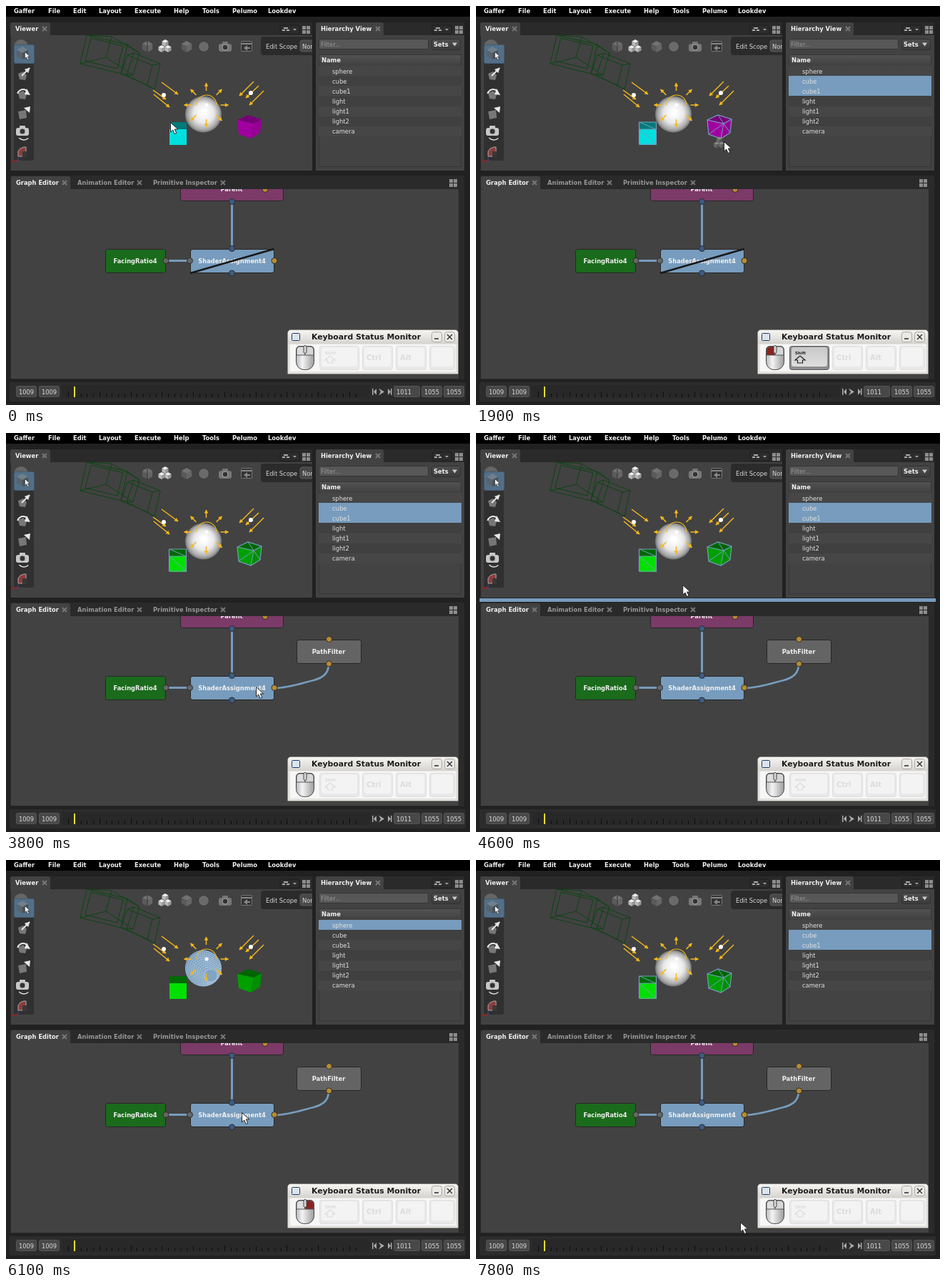
Write an HTML page with a canvas that moves like this. It is 650x560 px and loops after 8 s.

```html
<!DOCTYPE html>
<html>
<head>
<meta charset="utf-8">
<style>
html, body { margin: 0; width: 100%; height: 100%; overflow: hidden; background: #222; }
canvas { display: block; }
</style>
</head>
<body>
<canvas id="stage" width="650" height="560"></canvas>
<script>
const c = document.getElementById('stage').getContext('2d');
const BLUE = '#779cbd', AMBER = '#b98c30', NAVY = '#3d5c86', GOLD = '#f4b91c', PANE = '#424242';

// ---------- drawing helpers ----------
function box(x, y, w, h, fill, r = 0, stroke) {
  c.beginPath();
  c.roundRect(x, y, w, h, r);
  if (fill) { c.fillStyle = fill; c.fill(); }
  if (stroke) { c.strokeStyle = stroke; c.lineWidth = 1; c.stroke(); }
}
function path(pts, color, w = 1, fill) {
  c.beginPath();
  for (let i = 0; i < pts.length; i += 2) c.lineTo(pts[i], pts[i + 1]);
  if (fill) { c.closePath(); c.fillStyle = fill; c.fill(); }
  if (color) { c.strokeStyle = color; c.lineWidth = w; c.stroke(); }
}
const poly = (pts, fill, stroke, w) => path(pts, stroke, w, fill);
function dot(x, y, r, fill, stroke) {
  c.beginPath();
  c.arc(x, y, r, 0, 7);
  if (fill) { c.fillStyle = fill; c.fill(); }
  if (stroke) { c.strokeStyle = stroke; c.lineWidth = 1; c.stroke(); }
}
function arc(x, y, r, a, b, color, w) {
  c.beginPath();
  c.arc(x, y, r, a, b);
  c.strokeStyle = color;
  c.lineWidth = w;
  c.stroke();
}
function text(s, x, y, color = '#dcdcdc', bold = false, size = 8.35, align = 'left') {
  c.font = `${bold ? 'bold ' : ''}${size}px "DejaVu Sans", sans-serif`;
  c.textAlign = align;
  c.fillStyle = color;
  c.fillText(s, x, y + size * 0.36);
}
function shade(y0, y1, a, b) {
  const g = c.createLinearGradient(0, y0, 0, y1);
  g.addColorStop(0, a);
  g.addColorStop(1, b);
  return g;
}
function arrow(x0, y0, x1, y1, color = GOLD, w = 1.5, head = 5) {
  path([x0, y0, x1, y1], color, w);
  const a = Math.atan2(y1 - y0, x1 - x0), p = d => [x1 - head * Math.cos(a + d), y1 - head * Math.sin(a + d)];
  poly([x1, y1, ...p(.5), ...p(-.5)], color, color, .5);
}
function isoCube(x, y, s, top, left, right) {
  poly([x, y - s, x + s * .9, y - s * .5, x, y, x - s * .9, y - s * .5], top);
  poly([x - s * .9, y - s * .5, x, y, x, y + s, x - s * .9, y + s * .5], left);
  poly([x + s * .9, y - s * .5, x, y, x, y + s, x + s * .9, y + s * .5], right);
}
function clip(x, y, w, h, draw) {
  c.save();
  c.beginPath();
  c.rect(x, y, w, h);
  c.clip();
  draw();
  c.restore();
}

// ---------- timeline ----------
const moves = [
  [0, 230, 163], [300, 230, 163], [900, 335, 161], [1200, 339, 165], [1700, 339, 166],
  [1900, 347, 190], [2500, 350, 356], [4000, 350, 356], [4900, 268, 163], [5300, 268, 163],
  [6100, 330, 354], [6500, 330, 354], [6900, 372, 487], [7300, 370, 508], [8000, 370, 508]
];
function cursorAt(t) {
  const i = moves.findIndex((m, k) => k && t <= m[0]);
  const [t0, x0, y0] = moves[i - 1], [t1, x1, y1] = moves[i];
  const u = (t - t0) / (t1 - t0), e = u * u * (3 - 2 * u);
  return [x0 + (x1 - x0) * e, y0 + (y1 - y0) * e];
}
const during = (t, ...spans) => spans.some(([a, b]) => t >= a && t < b);
function stateAt(t) {
  return {
    t, cursor: cursorAt(t),
    left: during(t, [100, 300], [1000, 1200], [1400, 2700], [2800, 3000], [4900, 5200], [7600, 7800]),
    right: during(t, [6100, 6600]),
    shift: during(t, [700, 2300]),
    keyD: during(t, [3200, 3800]),
    drag: during(t, [1900, 2700]),
    cubeSel: during(t, [1000, 4900], [7600, 8000]),
    cube1Sel: during(t, [100, 4900], [7600, 8000]),
    sphereSel: during(t, [4900, 7600]),
    filter: t >= 2700, enabled: t >= 3200,
    menu: during(t, [6200, 7600]),
    splitter: during(t, [4600, 4700])
  };
}

// ---------- frame of the window ----------
function layoutIcon(x, y) {
  for (const i of [0, 1]) for (const j of [0, 1]) box(x + i * 6, y + j * 6, 5, 5, '#8c8c8c');
}
function tab(s, x, y, closeX, active) {
  if (active) box(x - 7, y - 9, closeX - x + 15, 19, PANE, [3, 3, 0, 0]);
  text(s, x, y, active ? '#f0f0f0' : '#969696', true);
  path([closeX - 3, y - 3, closeX + 3, y + 3], '#777', 2);
  path([closeX + 3, y - 3, closeX - 3, y + 3], '#777', 2);
}
function pinButton(x) {
  box(x, 27, 27, 12, '#2d2d2d', 2, '#1c1c1c');
  box(x + 3, 33, 4, 2, '#aaa');
  box(x + 9, 33, 4, 2, '#aaa');
  box(x + 5, 30, 6, 2, '#aaa');
  poly([x + 18, 32, x + 23, 32, x + 20.5, 34.5], '#aaa');
}
function chrome(s) {
  box(0, 0, 650, 560, '#212121');
  box(0, 0, 650, 15, '#000');
  'Gaffer 11 File 59 Edit 94 Layout 130 Execute 180 Help 235 Tools 275 Pelumo 317 Lookdev 367'
    .replace(/(\w+) (\d+)/g, (_, w, x) => text(w, +x, 7, '#f2f2f2', true));
  box(6, 23, 423, 208, '#2a2a2a');
  box(434, 23, 208, 208, '#2a2a2a');
  box(6, 238, 636, 286, '#2a2a2a');
  if (s.splitter) box(5, 232, 639, 5, BLUE);
  tab('Viewer', 13, 32, 54, true);
  tab('Hierarchy View', 441, 32, 521, true);
  tab('Graph Editor', 14, 248, 82, true);
  tab('Animation Editor', 100, 248, 187);
  tab('Primitive Inspector', 206, 248, 304);
  pinButton(384);
  pinButton(597);
  layoutIcon(415, 28);
  layoutIcon(629, 28);
  layoutIcon(621, 243);
}

// ---------- viewer ----------
function cameraWire() {
  const g = '#0b4512';
  path([113, 41, 104, 81, 161, 95, 170, 54, 113, 41], g);
  path([119, 45, 111, 77, 156, 88, 164, 56, 119, 45], g);
  path([113, 41, 148, 43, 187, 66, 170, 54], g);
  path([148, 43, 140, 72, 104, 81], g);
  path([140, 72, 178, 97, 161, 95], g);
  path([187, 66, 178, 97], g);
  path([179, 66, 216, 81, 208, 117, 169, 97, 179, 66], g);
  path([170, 69, 205, 83, 198, 111, 161, 95, 170, 69, 179, 66], g);
  path([205, 83, 216, 81], g);
  path([198, 111, 208, 117], g);
}
function sphere(selected) {
  const x = 276.5, y = 152, r = 25.5;
  const g = c.createRadialGradient(x + 1, y - 3, 3, x, y, r);
  g.addColorStop(0, selected ? '#86a8c7' : '#fff');
  g.addColorStop(.5, selected ? '#86a8c7' : '#e8e8e8');
  g.addColorStop(.85, selected ? '#7b9fbf' : '#a8a8a8');
  g.addColorStop(1, selected ? '#779cbd' : '#747474');
  dot(x, y, r, g);
  if (!selected) return;
  c.save();
  c.beginPath();
  c.arc(x, y, r, 0, 7);
  c.clip();
  c.setLineDash([1.4, 1.4]);
  c.strokeStyle = '#d4e0ea';
  c.lineWidth = 1;
  for (let i = 3; i < 17; i++) {
    c.beginPath();
    c.ellipse(287 - i * .8, 164 - i * .9, 2 + i * 2.1, 1.6 + i * 1.9, .8, 0, 7);
    c.stroke();
  }
  c.setLineDash([]);
  dot(287, 162, 9, '#80a4c4', '#a9c3da');
  c.restore();
}
function cubes(s) {
  const green = s.enabled;
  box(229, 163, 24, 10, green ? '#006800' : '#007a7a');
  box(229, 173, 24, 22, green ? '#00e000' : '#00dfdf');
  if (s.cube1Sel) {
    path([228.5, 163, 252.5, 163, 252.5, 194, 228.5, 194, 228.5, 163], BLUE, 1.2);
    path([252.5, 173, 228.5, 173, 252.5, 194], BLUE, 1);
    path([229, 163, 252, 173], BLUE, 1);
  }
  const [top, left, right] = green ? ['#006400', '#00a000', '#009000'] : ['#780078', '#a000a0', '#960096'];
  poly([324, 160, 339, 153, 358, 159, 347, 165], top);
  poly([324, 160, 347, 165, 343, 186, 326, 180], left);
  poly([347, 165, 358, 159, 356, 178, 343, 186], right);
  if (s.cubeSel) {
    path([324, 160, 339, 153, 358, 159, 356, 178, 343, 186, 326, 180, 324, 160, 347, 165, 358, 159], BLUE, 1.2);
    path([326, 180, 347, 165, 343, 186], BLUE, 1);
    path([339, 153, 347, 165, 356, 178], BLUE, 1);
  }
}
function lights() {
  for (let i = 0; i < 8; i++) {
    const a = i * Math.PI / 4, u = Math.cos(a), v = Math.sin(a);
    arrow(280.5 + u * 20, 139 + v * 20, 280.5 + u * 31, 139 + v * 31);
  }
  arc(281, 139, 14, Math.PI, Math.PI * 2, GOLD, 1.2);
  dot(281, 139, 2.5, '#fff');
  arrow(218, 107, 241, 124);
  arrow(206, 118, 224, 131);
  arrow(207, 124, 229, 142);
  arrow(347, 106, 327, 126);
  arrow(354, 112, 336, 129);
  arrow(361, 119, 341, 139);
  dot(221, 125, 3, '#fff');
  dot(343, 122, 3, '#fff');
}
function photoIcon(x, y, col) {
  box(x - 9, y - 5, 18, 11, col, 3);
  box(x - 4, y - 8, 8, 4, col, 1);
  dot(x, y, 4, '#333', '#aaa');
}
function viewerTools() {
  dot(21, 57, 10, '#666');
  box(11, 54, 28, 163, 'rgba(42,42,42,.75)', 3);
  box(11.5, 54.5, 28, 26, '#536f88', 2, '#435b70');
  isoCube(23, 66, 9, '#707f8c', '#58636d', '#48525b');
  pointer(26, 64, .7);
  poly([17, 95, 24, 92, 29, 97, 27, 104, 19, 103], '#777');
  arrow(22, 98, 33, 87, '#e8e8e8', 2, 7);
  poly([17, 122, 24, 119, 29, 124, 27, 131, 19, 130], '#777');
  arc(24, 125, 8, 3.4, 5.6, '#e8e8e8', 2);
  poly([29, 116, 34, 125, 26, 124], '#e8e8e8');
  poly([17, 148, 28, 146, 29, 157, 19, 159], '#777');
  poly([34, 141, 33, 150, 25, 143], '#e8e8e8');
  photoIcon(23, 176, '#c8c8c8');
  arc(25, 179, 9, .8, 2.4, '#ddd', 1.5);
  poly([17, 211, 17, 204, 20, 200, 25, 198, 28, 198, 28, 211], '#8e3c3c', '#aaa', 1);
  box(23, 204, 6, 8, '#383838');
  path([7, 219, 18, 216], '#a02020', 1.5);
  path([17, 212, 17, 219], '#2c4890', 1);

  for (const x of [198, 253]) isoCube(x, 57, 8, '#727272', '#5a5a5a', '#666');
  path([198, 49, 198, 65], '#333');
  for (const [x, y] of [[223, 52], [218, 60], [227, 60]]) isoCube(x, y, 5, '#eee', '#bbb', '#999');
  dot(277, 57, 7.5, '#6a6a6a', '#383838');
  photoIcon(307, 58, '#777');
  box(329.5, 49.5, 15, 14, '#333', 1, '#777');
  path([330, 53, 344, 53], '#888', 2);
  poly([333, 59, 338, 55, 338, 58, 342, 58, 342, 60, 338, 60, 338, 63], '#888');
  box(357, 43, 80, 26, '#2b2b2b', 4);
  text('Edit Scope', 364, 57, '#d8d8d8');
  box(412, 48, 30, 16, '#484848', 3, '#5a5a5a');
  text('None', 415, 57, '#d8d8d8');
}
function viewer(s) {
  clip(7, 41, 422, 190, () => {
    box(7, 41, 422, 190, PANE);
    cameraWire();
    sphere(s.sphereSel);
    cubes(s);
    lights();
    viewerTools();
  });
}

// ---------- hierarchy ----------
function hierarchy(s) {
  box(434, 41, 208, 190, PANE);
  box(438.5, 46.5, 153, 14, '#575757', 2, '#343434');
  text('Filter...', 441, 54, '#989898');
  box(596.5, 46.5, 40, 15, shade(46, 62, '#505050', '#3a3a3a'), 3, '#303030');
  text('Sets', 599, 54, '#f0f0f0', true);
  poly([625, 51.5, 632, 51.5, 628.5, 56.5], '#ccc');
  box(438.5, 68.5, 199, 157, '#434343', 0, '#363636');
  box(439, 69, 198, 15, shade(69, 84, '#525252', '#404040'));
  text('Name', 442, 76, '#f0f0f0', true);
  const sel = [s.sphereSel, s.cubeSel, s.cube1Sel], rowY = i => Math.round(84 + i * 14.15);
  ['sphere', 'cube', 'cube1', 'light', 'light1', 'light2', 'camera'].forEach((name, i) => {
    box(438, rowY(i), 200, rowY(i + 1) - rowY(i), sel[i] ? BLUE : i % 2 ? '#404040' : '#464646');
    text(name, 457, 91.5 + i * 14.15, '#e2e2e2');
  });
}

// ---------- node graph ----------
function node(name, x, y, w, fill) {
  box(x + .5, y + .5, w, 33, fill, 3, '#262626');
  text(name, x + w / 2, y + 17, '#f0f0f0', true, 8.35, 'center');
}
const plug = (x, y, col) => dot(x, y, 4, col, '#2b2b2b');
function graph(s) {
  clip(7, 257, 627, 266, () => {
    box(7, 257, 627, 266, PANE);
    path([316.5, 275, 316.5, 341], BLUE, 3);
    path([223, 357.5, 258, 357.5], BLUE, 3);
    if (s.filter) {
      c.beginPath();
      c.moveTo(376, 358);
      c.bezierCurveTo(396, 358, 418, 350, 431, 347);
      c.bezierCurveTo(446, 343, 452, 336, 452, 324);
      c.strokeStyle = BLUE;
      c.lineWidth = 2.7;
      c.stroke();
      node('PathFilter', 407, 290, 90, '#646464');
      plug(452.5, 289.5, AMBER);
      plug(452.5, 324, AMBER);
    }
    node('Parent', 244, 240, 144, '#7c3a68');
    plug(363, 257.5, AMBER);
    plug(316.5, 274.5, NAVY);
    node('FacingRatio4', 139, 341, 84, '#1b6b1c');
    node('ShaderAssignment4', 258, 341, 117, BLUE);
    if (!s.enabled) path([258, 375, 375.5, 341], '#181818', 2.6);
    plug(224, 357.5, '#666');
    plug(257.5, 357.5, '#666');
    plug(376, 357.5, AMBER);
    plug(316.5, 340.5, NAVY);
    plug(316.5, 375, NAVY);
  });
}

// ---------- timeline bar ----------
function timeBar() {
  box(5, 528, 639, 27, '#2c2c2c', 2);
  box(78, 532, 432, 18, '#282828');
  for (let i = 0; i < 47; i++) {
    const x = Math.round(87 + i * 8.75) + .5;
    path([x, i % 5 ? 544 : 541, x, 549], '#0d0d0d');
  }
  box(95, 534, 2, 15, '#f2dc2e');
  [[14, 1009, 28], [46, 1009, 28], [543, 1011, 36], [582, 1055, 28], [613, 1055, 28]].forEach(([x, n, w]) => {
    box(x + .5, 533.5, w, 15, '#484848', 2, '#555');
    text(n, x + 14.5, 542, '#dcdcdc', false, 8.35, 'center');
  });
  box(513, 537, 1.5, 9, '#aaa');
  poly([519, 537, 519, 546, 515, 541.5], '#aaa');
  poly([522, 536.5, 530, 541.5, 522, 546.5, 525, 541.5], '#aaa');
  poly([535, 537, 539, 541.5, 535, 546], '#aaa');
  box(539, 537, 1.5, 9, '#aaa');
}

// ---------- keyboard monitor ----------
function key(x, w, name, on) {
  box(x + .5, 477.5, w - 1, 33, on ? '#8e8e8e' : '#e9e9e9', 3, on ? '#5a5a5a' : '#dedede');
  box(x + 3, 479, w - 6, 27, on ? shade(479, 506, '#c8c8c8', '#dedede') : '#f3f3f3', 3);
  const ink = on ? '#222' : '#dcdcdc';
  if (name === 'Shift') {
    text(name, x + 8, 487, ink, true, 5.6);
    path([x + 15, 491, x + 22, 497, x + 18.5, 497, x + 18.5, 501, x + 11.5, 501, x + 11.5, 497, x + 8, 497, x + 15, 491], ink, 1.2);
  } else text(name, x + 6, 493, ink, true, 10);
}
function keyMonitor(s) {
  box(394.5, 454.5, 239, 62, '#e4e2de', [5, 5, 1, 1], '#8b8984');
  box(395, 455, 238, 19, shade(455, 474, '#f6f5f3', '#d6d4cf'), [4, 4, 0, 0]);
  box(398, 475, 232, 38, '#f7f7f7');
  box(400.5, 459.5, 11, 10, '#dce4ee', 1, '#1f3c64');
  text('Keyboard Status Monitor', 504.5, 464, '#1c1c1c', true, 10.85, 'center');
  for (const x of [596, 614]) box(x + .5, 457.5, 14, 14, '#ebe9e6', 3, '#aaa7a1');
  path([600, 467, 606, 467], '#333', 1.6);
  path([618, 461, 625, 468], '#333', 1.4);
  path([625, 461, 618, 468], '#333', 1.4);

  const g = c.createLinearGradient(406, 0, 432, 0);
  g.addColorStop(0, '#b4b4b4');
  g.addColorStop(.35, '#f4f4f4');
  g.addColorStop(1, '#9a9a9a');
  box(406.5, 477.5, 25, 33, g, [5, 5, 11, 11], '#444');
  box(407, 478, 12, 12, s.left ? '#8a2323' : '#dedede', [5, 0, 0, 0], '#555');
  box(419, 478, 12, 12, s.right ? '#8a2323' : '#d6d6d6', [0, 5, 0, 0], '#555');
  box(417, 476.5, 4, 11, '#d8d8d8', 2, '#444');
  key(439, 56, 'Shift', s.shift);
  key(499, 43, 'Ctrl');
  key(546, 43, 'Alt');
  key(593, 36, s.keyD ? 'D' : '', s.keyD);
}

// ---------- context menu ----------
const items = [['Edit...', 387], ['Enabled', 415, 1], ['Show Input Connections', 442, 1],
  ['Show Output Connections', 457, 1], ['Set Color...', 484], ['Select Affected Objects', 511.5],
  ['Bookmarked', 539.5], ['Numeric Bookmark', 554]];
function menu([, my]) {
  box(331, 356, 166, 204, '#4c4c4c');
  path([331.5, 560, 331.5, 356], '#696969');
  path([496.5, 560, 496.5, 356], '#696969');
  box(331, 356, 165, 19, '#000');
  text('ShaderAssignment4', 348, 366, '#f0f0f0', true);
  for (const y of [401, 429, 470, 498, 525]) box(341, y, 147, 1, '#343434');
  for (const [name, y, tick] of items) {
    if (Math.abs(my - y) < 7.2) box(332, y - 7, 164, 14, BLUE);
    text(name, 348, y, '#e2e2e2');
    if (tick) path([336, y, 339, y + 4, 344, y - 5], '#f2f2f2', 1.6);
  }
  path([484, 549, 488, 553.5, 484, 558], '#222', 1.6);
}

// ---------- pointer ----------
function pointer(x, y, k = 1) {
  c.save();
  c.translate(x, y);
  c.scale(k, k);
  poly([.5, .5, .5, 14, 3.7, 11, 6.2, 16.5, 8.8, 15.3, 6.3, 10, 10.8, 10], '#fff', '#222', 1);
  c.restore();
}
function dragIcon(x, y) {
  for (const [dx, dy] of [[-5, -2], [-9, 5], [-2, 5]]) isoCube(x + dx, y + dy, 4.5, '#8a8a8a', '#686868', '#565656');
}

function draw(now) {
  const s = stateAt(Math.floor(now % 8000 / 100) * 100);
  chrome(s);
  viewer(s);
  hierarchy(s);
  graph(s);
  timeBar();
  keyMonitor(s);
  if (s.menu) menu(s.cursor);
  const [x, y] = s.cursor;
  if (s.drag) dragIcon(x - (s.t > 2300 ? 16 : 1), y);
  pointer(x, y);
  requestAnimationFrame(draw);
}
requestAnimationFrame(draw);
</script>
</body>
</html>
```
